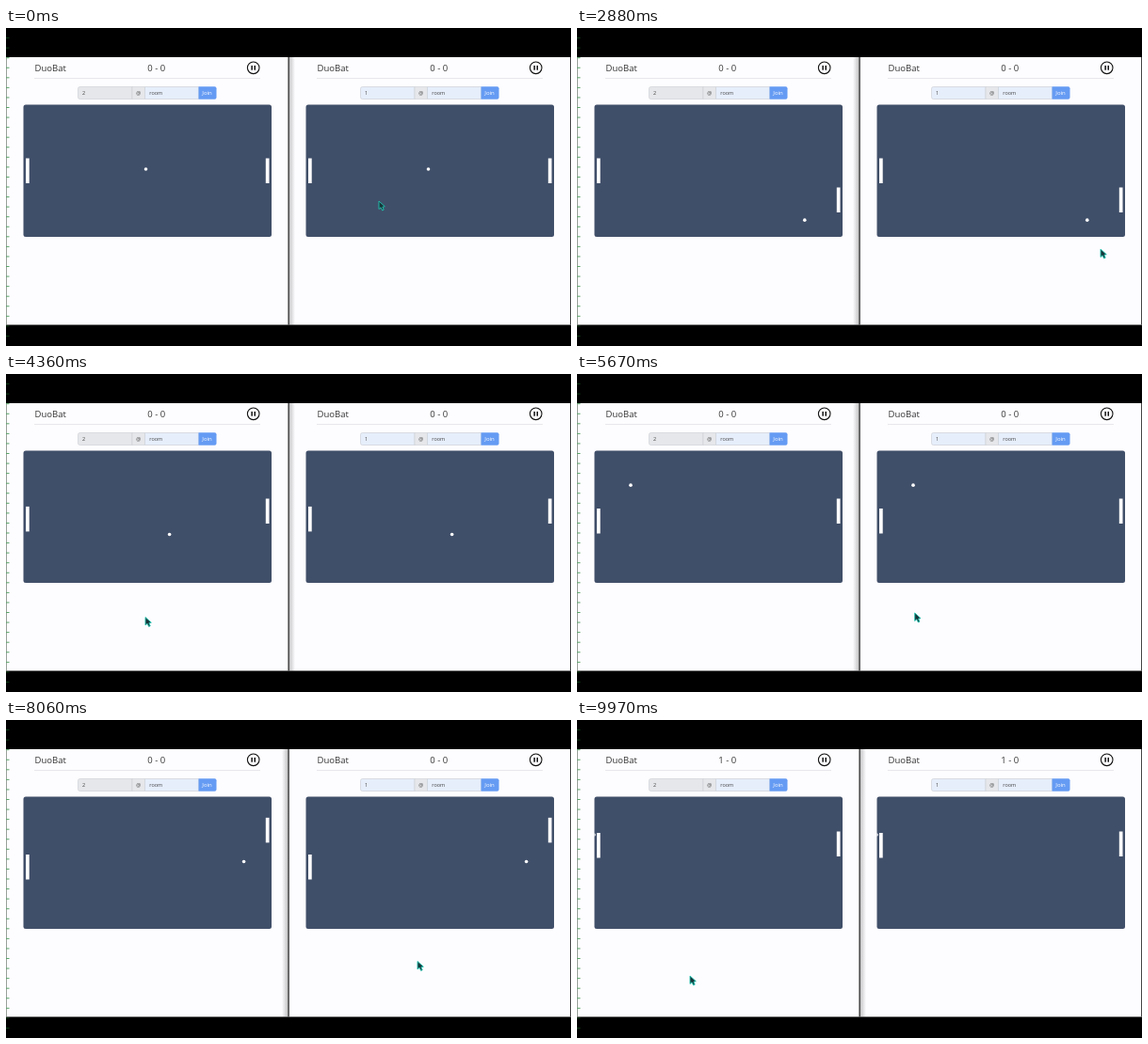
Animation of 600x338 px, one loop 10000 ms. Source, as an HTML page with a canvas:

```html
<!DOCTYPE html>
<html lang="en">
<head>
<meta charset="utf-8">
<title>Two-player paddle game</title>
<style>
  html, body { margin: 0; width: 100%; height: 100%; overflow: hidden; background: #000; }
  canvas { display: block; }
</style>
</head>
<body>
<canvas id="stage" width="600" height="338"></canvas>
<script>
const ctx = document.getElementById('stage').getContext('2d');
const LOOP = 10000, SCORE_TIME = 8960;
const PADDLE_SPEED = 0.15, GLIDE_TIME = 650;
const WALLS = { left: 20, right: 265, top: 82, bottom: 221.5, lastLeg: 7 };

// Ball key points [time, x, y] on unfolded axes; each wall hit folds the path back.
const ballKeys = [[2590, 148.5, 150], [2880, 241.5, 238.5],
                  [6820, 1364.5, 1542], [SCORE_TIME, 1982, 2274]];

// Paddle moves: [start, target y]. Pointer glides: [start, target x, target y].
const leftMoves = [[4345, 143], [8900, 120]];
const rightMoves = [[2640, 169.5], [3120, 132.5], [7870, 103.5], [8350, 118.5]];
const glides = [[200, 556, 235], [3300, 148, 258.5], [5300, 496, 251],
                [7300, 437, 256.5], [9150, 120, 272]];

const clamp = (v, min, max) => Math.max(min, Math.min(max, v));
const smooth = p => p * p * (3 - 2 * p);

function fold(value, min, max, lastLeg = Infinity) {
  const size = max - min;
  const leg = Math.min(Math.floor((value - min) / size), lastLeg);
  const d = value - min - leg * size;
  return leg % 2 ? max - d : min + d;
}

function ballAt(t) {
  const next = clamp(ballKeys.findIndex(k => k[0] > t), 1, ballKeys.length - 1);
  const time = clamp(t, ballKeys[0][0], SCORE_TIME);
  const i = time === SCORE_TIME ? ballKeys.length - 1 : next;
  const a = ballKeys[i - 1], b = ballKeys[i];
  const p = (time - a[0]) / (b[0] - a[0]);
  return {
    x: fold(a[1] + (b[1] - a[1]) * p, WALLS.left, WALLS.right, WALLS.lastLeg),
    y: fold(a[2] + (b[2] - a[2]) * p, WALLS.top, WALLS.bottom)
  };
}

function paddleAt(moves, t) {
  return moves.reduce((y, [start, target]) => {
    const reach = Math.max(0, t - start) * PADDLE_SPEED;
    return y + clamp(target - y, -reach, reach);
  }, 138.5);
}

function pointerAt(t) {
  return glides.reduce((pos, [start, x, y]) => {
    const p = smooth(clamp((t - start) / GLIDE_TIME, 0, 1));
    return { x: pos.x + (x - pos.x) * p, y: pos.y + (y - pos.y) * p };
  }, { x: 396, y: 184 });
}

function rect(x, y, w, h, fill) {
  ctx.fillStyle = fill;
  ctx.fillRect(x, y, w, h);
}

function circle(x, y, r) {
  ctx.beginPath();
  ctx.arc(x, y, r, 0, 2 * Math.PI);
}

function box(x, y, w, h, radius, fill, stroke) {
  ctx.beginPath();
  ctx.roundRect(x, y, w, h, radius);
  ctx.fillStyle = fill;
  ctx.fill();
  if (stroke) {
    ctx.strokeStyle = stroke;
    ctx.lineWidth = 0.7;
    ctx.stroke();
  }
}

function text(str, x, y, size, color, align = 'left') {
  ctx.font = `${size}px "Open Sans", "Noto Sans", sans-serif`;
  ctx.textAlign = align;
  ctx.fillStyle = color;
  ctx.fillText(str, x, y);
}

function drawHeader(t) {
  text('DuoBat', 30.5, 46, 9.5, '#333');
  text(t < SCORE_TIME ? '0 - 0' : '1 - 0', 159.8, 46, 9.5, '#333', 'center');
  circle(262.7, 42.3, 6.3);
  ctx.strokeStyle = '#111';
  ctx.lineWidth = 1.1;
  ctx.stroke();
  for (const x of [260.4, 263.5]) rect(x, 39.9, 1.5, 4.8, '#111');
  rect(30, 53, 240, 0.8, '#e4e4e8');
}

function drawForm(player) {
  const border = '#cfd3d8', gray = '#e6e7ea', blue = '#e6eefb';
  box(76.5, 62.5, 57.5, 13, [2, 0, 0, 2], player === '2' ? gray : blue, border);
  box(134, 62.5, 13.5, 13, 0, gray, border);
  box(147.5, 62.5, 57, 13, 0, blue, border);
  box(204.5, 62.2, 19, 13.6, [0, 2, 2, 0], '#659bf3');
  text(player, 81, 71.4, 5.5, '#444');
  text('@', 140.8, 71, 5.5, '#444', 'center');
  text('room', 152.3, 71.2, 5.5, '#444');
  text('Join', 213.5, 71.4, 6, '#fff', 'center');
}

function drawCourt(t) {
  ctx.save();
  box(18.5, 81.5, 263.5, 140.5, 2.5, '#404f69');
  ctx.clip();
  rect(21, paddleAt(leftMoves, t), 3.7, 26.5, '#fff');
  rect(275.8, paddleAt(rightMoves, t), 3.7, 26.5, '#fff');
  const ball = ballAt(t);
  circle(ball.x, ball.y, 1.8);
  ctx.fill();
  ctx.restore();
}

function drawPanel(offset, player, t) {
  ctx.save();
  ctx.translate(offset, 0);
  drawHeader(t);
  drawForm(player);
  drawCourt(t);
  ctx.restore();
}

// The focused window casts its shadow on the other one.
function drawWindowEdges(leftFocused) {
  const far = leftFocused ? 307 : 293;
  const shadow = ctx.createLinearGradient(300, 0, far, 0);
  shadow.addColorStop(0, 'rgba(0,0,0,.25)');
  shadow.addColorStop(1, 'rgba(0,0,0,0)');
  rect(Math.min(300, far), 31, 7, 284.5, shadow);
  rect(299.5, 31, 1.2, 284.5, '#222');
  rect(599, 31, 1, 284.5, '#444');
  rect(0, 31, 0.6, 284.5, '#576457');

  const step = 338 / 32;
  for (let y = step; y < 330; y += step) {
    const onPage = y > 31 && y < 315;
    rect(0, y - 0.5, 3.5, 1, onPage ? '#5aa568' : '#0c3c14');
  }
}

function drawPointer({ x, y }) {
  ctx.save();
  ctx.translate(x, y);
  ctx.beginPath();
  [[0, 0], [0, 8.5], [2, 6.8], [3.7, 10], [5.2, 9.2], [3.9, 6.2], [6.3, 5.7]]
    .forEach(p => ctx.lineTo(...p));
  ctx.closePath();
  ctx.fillStyle = '#17363a';
  ctx.strokeStyle = '#22c4b2';
  ctx.lineWidth = 0.9;
  ctx.fill();
  ctx.stroke();
  ctx.restore();
}

function draw() {
  const t = performance.now() % LOOP;
  const pointer = pointerAt(t);
  rect(0, 0, 600, 338, '#000');
  rect(0, 31, 600, 284.5, '#fdfcfe');
  drawPanel(0, '2', t);
  drawPanel(300, '1', t);
  drawWindowEdges(t < 950 || pointer.x < 300);
  drawPointer(pointer);
  requestAnimationFrame(draw);
}
draw();
</script>
</body>
</html>
```
